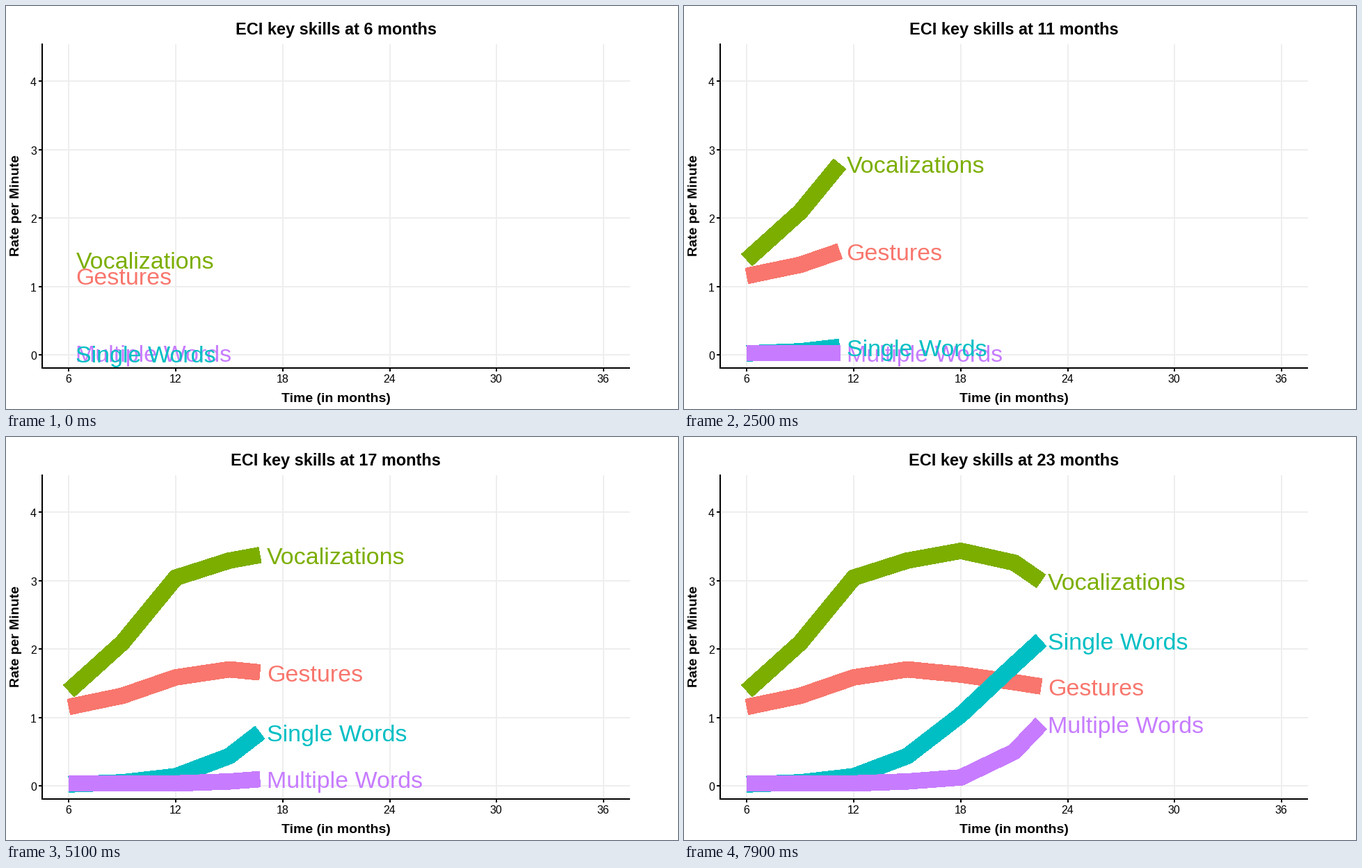
Recreate the animation shown at these times as a matplotlib script. Size 966 by 580 pixels, loop 8 s.

```python
import numpy as np
import matplotlib.pyplot as plt
from matplotlib.animation import FuncAnimation

W, H, DPI = 966, 580, 100
PT = 72 / DPI                      # points per pixel
FRAMES, INTERVAL = 80, 100
SPAN = 143                         # steps needed to go from month 6 to month 36
LEFT, RIGHT, TOP, BOTTOM = 52, 897, 55, 521

MONTHS = np.arange(6, 25, 3)
# Vertices fall on whole steps, so segments last 14 or 15 of them.
KEYS = np.round((MONTHS - 6) * SPAN / 30)

# name, colour, rate at each vertex, label stacking order
SERIES = [
    ("Gestures", "#F8766D", [1.155, 1.318, 1.587, 1.703, 1.627, 1.516, 1.395], 1),
    ("Vocalizations", "#7CAE00", [1.389, 2.092, 3.043, 3.292, 3.434, 3.262, 2.723], 2),
    ("Single Words", "#00BFC4", [0.023, 0.054, 0.143, 0.437, 1.038, 1.770, 2.484], 4),
    ("Multiple Words", "#C77CFF", [0.038, 0.038, 0.038, 0.066, 0.125, 0.500, 1.319], 3),
]

plt.rcParams["font.family"] = "Liberation Sans"


def px(month):
    return 90.4 + 25.62 * (np.asarray(month) - 6)


def py(rate):
    return 502.3 - 98.55 * np.asarray(rate)


fig = plt.figure(figsize=(W / DPI, H / DPI), dpi=DPI, facecolor="white")
ax = fig.add_axes([0, 0, 1, 1])
ax.set_xlim(0, W)
ax.set_ylim(H, 0)
ax.axis("off")


def rule(xs, ys, color, z, cap="butt"):
    ax.plot(xs, ys, color=color, lw=2 * PT, zorder=z, snap=True,
            solid_capstyle=cap)


def write(x, y, s, size, **kw):
    kw.setdefault("va", "baseline")
    return ax.text(x, y, s, fontsize=size * PT, **kw)


for rate in range(5):
    y = float(py(rate))
    rule([LEFT, RIGHT], [y, y], "#EEEEEE", 1)
    rule([LEFT - 5, LEFT], [y, y], "black", 6)
    write(44, y + 13 - 6, str(rate), 16, ha="right")

for month in range(6, 37, 6):
    x = float(px(month))
    rule([x, x], [TOP, BOTTOM], "#EEEEEE", 1)
    rule([x, x], [BOTTOM, BOTTOM + 5], "black", 6)
    write(x - 0.5, 542.5, str(month), 16, ha="center")

rule([LEFT, LEFT], [TOP, BOTTOM], "black", 6, "projecting")
rule([LEFT, RIGHT], [BOTTOM, BOTTOM], "black", 6)

title = write(474.3, 41.5, "", 23.5, ha="center", weight="bold")
write(474.5, 570, "Time (in months)", 19.5, ha="center", weight="bold")
write(23, 287.5, "Rate per Minute", 19.5, ha="right", va="center",
      rotation=90, weight="bold")

lines, labels = [], []
for i, (name, color, rates, order) in enumerate(SERIES):
    line, = ax.plot([], [], color=color, lw=22.6 * PT, zorder=2 + i / 10,
                    antialiased=False, solid_capstyle="butt",
                    solid_joinstyle="round")
    lines.append(line)
    labels.append(write(0, 0, name, 34, color=color, zorder=4 + order / 10))


def update(i):
    title.set_text(f"ECI key skills at {round(6 + 30 * i / SPAN)} months")
    passed = KEYS < i
    month = np.interp(i, KEYS, MONTHS)
    xs = px(np.append(MONTHS[passed], month))
    for (_, _, rates, _), line, label in zip(SERIES, lines, labels):
        rate = np.interp(i, KEYS, rates)
        ys = py(np.append(np.array(rates)[passed], rate))
        line.set_data(xs, ys)
        label.set_position((xs[-1] + 10, ys[-1] + 13))
    return [title, *lines, *labels]


anim = FuncAnimation(fig, update, frames=FRAMES, interval=INTERVAL,
                     repeat=True, repeat_delay=0, blit=False)
plt.show()
```
